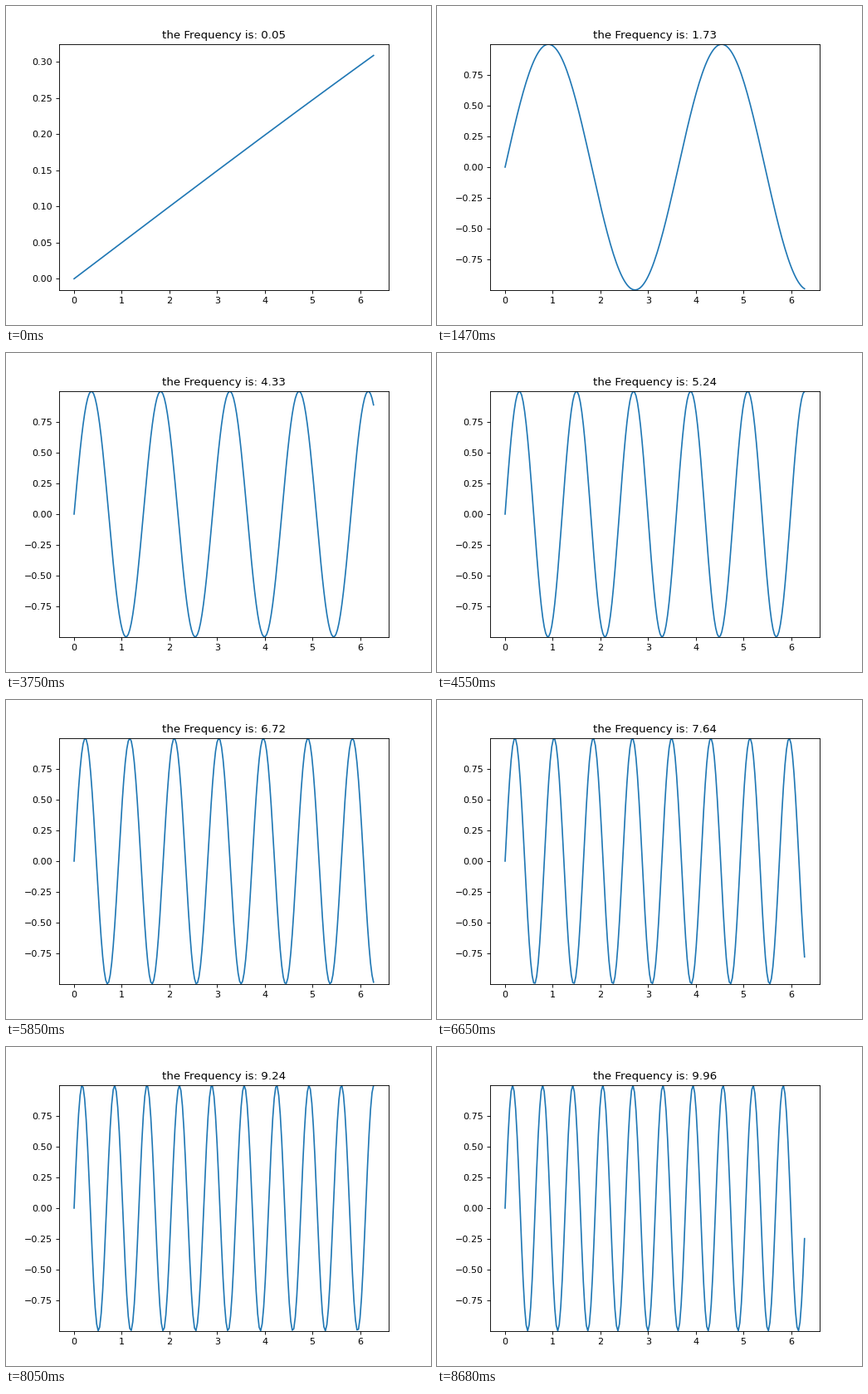
Write a matplotlib script that moves like this. It is 512 px wide and 384 px high and loops after 8710 ms.

```python
import matplotlib.pyplot as plt
import numpy as np
from matplotlib.animation import FuncAnimation

LOOP_MS = 8710
STEPS = 249

x = np.linspace(0, 2 * np.pi, 200)
freqs = np.linspace(0.05, 10, STEPS + 1)[:STEPS]

fig, ax = plt.subplots(figsize=(6.4, 4.8), dpi=80)
line, = ax.plot(x, np.sin(freqs[0] * x))


def running_limits(start):
    """The y range snaps to the curve whenever the curve leaves it."""
    lo, hi = start
    limits = []
    for freq in freqs:
        y = np.sin(freq * x)
        if y.min() < lo or y.max() > hi:
            lo, hi = y.min(), y.max()
        limits.append((lo, hi))
    return limits


limits = running_limits(ax.get_ylim())


def update(i):
    line.set_ydata(np.sin(freqs[i] * x))
    ax.set_ylim(limits[i])
    ax.set_title(f"the Frequency is: {freqs[i]:.2f}")
    return line,


anim = FuncAnimation(fig, update, frames=STEPS, interval=LOOP_MS / STEPS,
                     repeat=True, repeat_delay=0)
plt.show()
```
